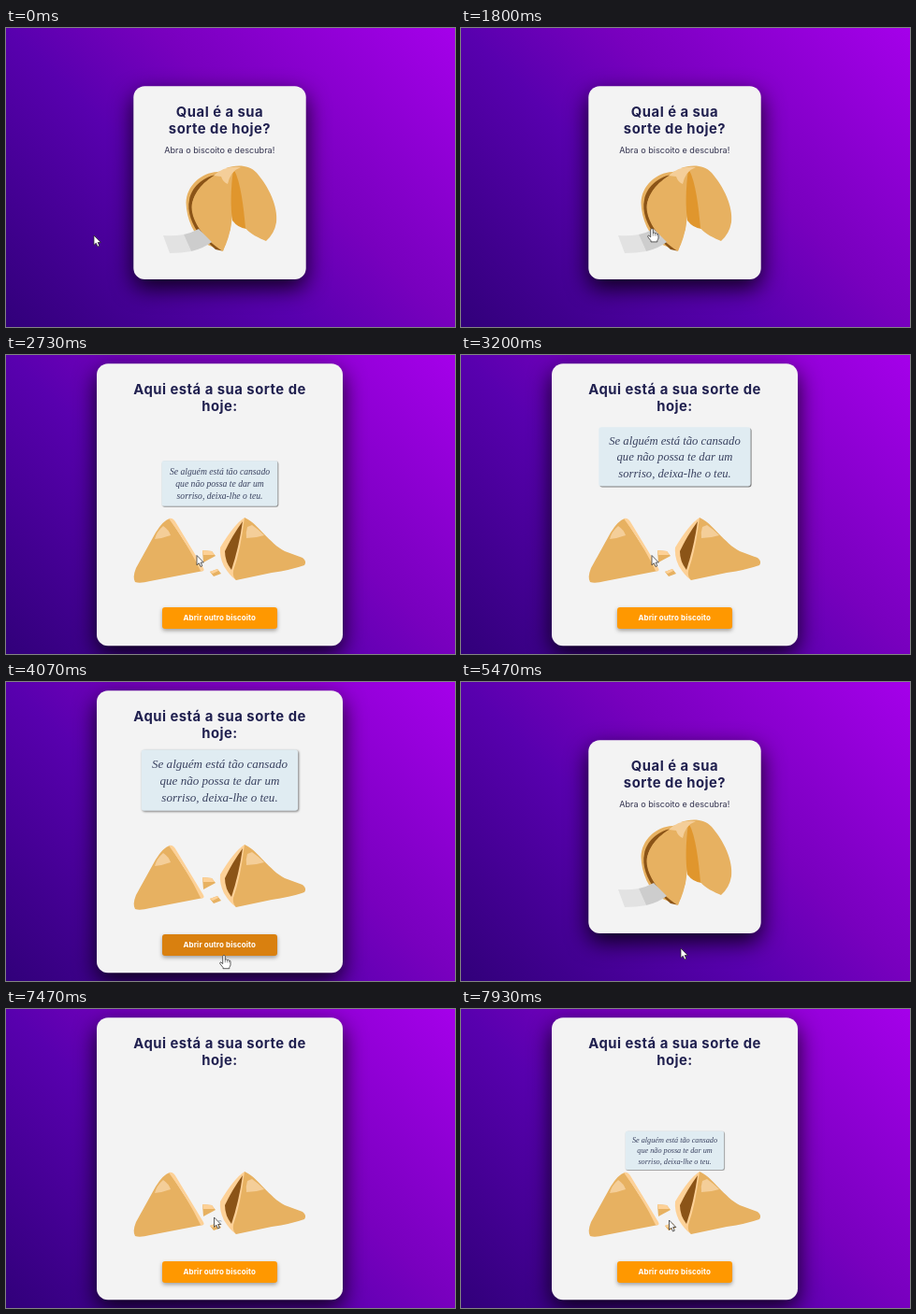
An HTML page for the animation above (8000 ms loop, 480 by 320 pixels).

```html
<!DOCTYPE html>
<html lang="pt-BR">
<head>
<meta charset="utf-8">
<title>Biscoito da sorte</title>
<style>
  html, body { margin: 0; width: 100%; height: 100%; overflow: hidden; }
  body { background: linear-gradient(45deg, #31007a, #5800ae 40%, #7800be 60%, #a500ea); }
  svg { display: block; width: 100vw; height: 100vh; }
  text { text-anchor: middle; font-family: Inter, sans-serif; }
  .card { fill: #f3f3f3; filter: drop-shadow(0 9px 12px rgba(0, 0, 0, .85)); }
  .title { font-size: 14.8px; font-weight: 700; letter-spacing: .5px; fill: #20204f; }
  .sub { font-size: 9.1px; fill: #33334f; }
  .label { font-size: 8px; font-weight: 700; letter-spacing: .1px; fill: #fff; }
  .button { filter: drop-shadow(0 2px 2px rgba(0, 0, 0, .35)); }
  .slip { fill: #e0ecf2; filter: drop-shadow(1px 1px .8px rgba(0, 0, 0, .5)); }
  .fortune { font: italic 13.05px "Liberation Serif", serif; fill: #3a4260; }
  .dough { fill: #e7b161; }
  .light { fill: #f4ce99; }
  .rim { fill: #fdd197; }
  .shade { fill: #e0962d; }
  .brown { fill: #8b5417; }
  .cursor path { fill: #fff; stroke: #2a2a2a; stroke-width: .75; stroke-linejoin: round; }
</style>
</head>
<body>
<svg viewBox="0 0 480 320">
  <g id="closed">
    <rect class="card" x="136.3" y="62.2" width="184.4" height="206.7" rx="12"/>
    <text class="title" x="228.5" y="95">Qual é a sua</text>
    <text class="title" x="228.5" y="112.7">sorte de hoje?</text>
    <text class="sub" x="228.3" y="134.3">Abra o biscoito e descubra!</text>
    <path class="dough" d="M226 154C208 155 193 169 192.5 187C193 205 201 222 213 231L232 239L240 215L246 150Z"/>
    <path class="brown" d="M224 157C210 160 198 171 196 184C193 195 199 212 208 222L224 237L231 238.5C212 226 200 208 199 192C199 178 210 165 224 157Z"/>
    <path class="dough" d="M224 158C210 165 199 179 198.5 192C199 208 212 226 232 238C241 222 244 196 241 175L246 150Z"/>
    <path class="shade" d="M243 152C240 172 240 192 242 206Q248 214 257 215L262 170Z"/>
    <path class="dough" d="M235 150C246 146 260 146 268 155C281 170 291 191 289 208Q287 220 278 228C271 225 260 220 256 214C254 191 251 166 244 152Z"/>
    <path class="light" d="M222 158Q233 147 251 149Q240 153 237 167Q232 165 230 159Z"/>
    <path fill="#e2e2e2" d="M168 222Q180 223 190 221L198 239Q187 241 175 241Z"/>
    <path fill="#cdcdcd" d="M190 221Q199 219 206 215L220 229Q211 236 198 239Z"/>
  </g>
  <g id="opened">
    <rect class="card" x="97" y="9.3" width="263" height="302" rx="12"/>
    <text class="title" x="228.5" y="42">Aqui está a sua sorte de</text>
    <text class="title" x="228.5" y="59.7">hoje:</text>
    <path class="dough" d="M175 175Q168 177 160 190L139 228Q135 238 138 243Q143 245 154 242Q180 237 211 231Z"/>
    <path class="rim" d="M174 175Q179 174 182 180L211 228Q213 232 208 231Q194 202 174 175Z"/>
    <path class="light" d="M168 183Q161 189 159 197Q168 196 176 193Q174 187 168 183Z"/>
    <path class="rim" d="M255 174Q244 181 229 206Q228 216 233 226Q239 236 246 241L262 215Z"/>
    <path class="brown" d="M253 178Q242 193 234 210Q234 221 241 230Q249 206 253 178Z"/>
    <path class="dough" d="M255 174C268 179 282 202 298 210L317 217Q322 221 319 225Q305 230 284 233L246 241Q242 237 243 231Q251 208 255 174Z"/>
    <path class="light" d="M258 184Q256 190 257 196Q267 196 276 193Q269 186 263 182Z"/>
    <path class="dough" d="M210 209L220 210L224 215L211 222Z"/>
    <path class="rim" d="M210 209L220 210L223 214L211 214Z"/>
    <path class="dough" d="M218 232L226 229L230 234L222 237Z"/>
    <path class="rim" d="M218 232L226 229L227 231L221 234Z"/>
    <rect id="button" class="button" x="167" y="270" width="123" height="23" rx="3"/>
    <text class="label" x="228.3" y="284.4">Abrir outro biscoito</text>
    <g id="slip">
      <rect class="slip" x="-83.8" y="-32.6" width="167.4" height="65.3" rx="3"/>
      <text class="fortune" y="-13">Se alguém está tão cansado</text>
      <text class="fortune" y="4.8">que não possa te dar um</text>
      <text class="fortune" y="22.6">sorriso, deixa-lhe o teu.</text>
    </g>
  </g>
  <g id="cursor" class="cursor">
    <path id="arrow" d="M0 0V10.3L2.3 8.2L4 12L5.8 11.2L4.2 7.5H7.3Z"/>
    <g id="hand">
      <path d="M-1.3 1Q0 -1 1.3 1V5Q2.6 4 3.6 5.3Q5 4.5 5.6 5.9Q7 5.4 7 7.2V10.5Q6.7 12 5.8 13V14.4H-1V13.2L-4.2 9.2Q-4.6 7.5 -3.2 7.6L-1.3 9.3Z"/>
      <path d="M1.3 5V8M3.6 5.3V8M5.6 5.9V8" fill="none" style="stroke-width:.5"/>
    </g>
  </g>
</svg>
<script>
const LOOP = 8000;
const el = id => document.getElementById(id);

// Intervals with the broken cookie on screen, and when its slip starts to rise
const openings = [
  { from: 1930, to: 5470, rise: 2110 },
  { from: 7470, to: LOOP, rise: 7420 }
];
const RISE_TIME = 1400;

// time, x, y of the pointer tip
const pointerPath = [
  [70, 94, 222], [1000, 204, 214.5], [3530, 204, 214.5], [4000, 233, 292.3],
  [4670, 233, 292.3], [5000, 235, 285], [5670, 235, 285], [6330, 222.5, 223],
  [7470, 222.5, 223], [7800, 222.5, 226]
];

const clamp = v => Math.min(1, Math.max(0, v));
const smooth = v => v * v * (3 - 2 * v);
const bezier = (u, a, b) => 3 * (1 - u) ** 2 * u * a + 3 * (1 - u) * u * u * b + u ** 3;

// CSS "ease" timing
function ease(p) {
  let lo = 0, hi = 1;
  for (let i = 0; i < 24; i++) {
    const mid = (lo + hi) / 2;
    if (bezier(mid, .25, .25) < p) lo = mid; else hi = mid;
  }
  return bezier(lo, .1, 1);
}

function pointerAt(t) {
  let prev = pointerPath[0];
  for (const next of pointerPath) {
    if (t < next[0]) {
      const k = smooth(clamp((t - prev[0]) / (next[0] - prev[0])));
      return [prev[1] + (next[1] - prev[1]) * k, prev[2] + (next[2] - prev[2]) * k];
    }
    prev = next;
  }
  return [prev[1], prev[2]];
}

const inside = ([x, y], left, top, right, bottom) =>
  x >= left && x <= right && y >= top && y <= bottom;
const show = (id, on) => el(id).setAttribute('display', on ? 'inline' : 'none');

function draw(t) {
  const opening = openings.find(o => t >= o.from && t < o.to);
  show('closed', !opening);
  show('opened', opening);

  const tip = pointerAt(t);
  const hover = opening ? inside(tip, 167, 270, 290, 293) : inside(tip, 168, 147, 290, 242);
  show('hand', hover);
  show('arrow', !hover);
  el('cursor').setAttribute('transform', `translate(${tip})`);
  el('button').setAttribute('fill', opening && hover ? '#d9800f' : '#ff9800');

  if (opening) {
    const s = ease(clamp((t - opening.rise) / RISE_TIME));
    el('slip').setAttribute('transform', `translate(228.5 ${230 - 125 * s}) scale(${s})`);
  }
}

const start = performance.now();
function tick() {
  draw((performance.now() - start) % LOOP);
  requestAnimationFrame(tick);
}
tick();
</script>
</body>
</html>
```
